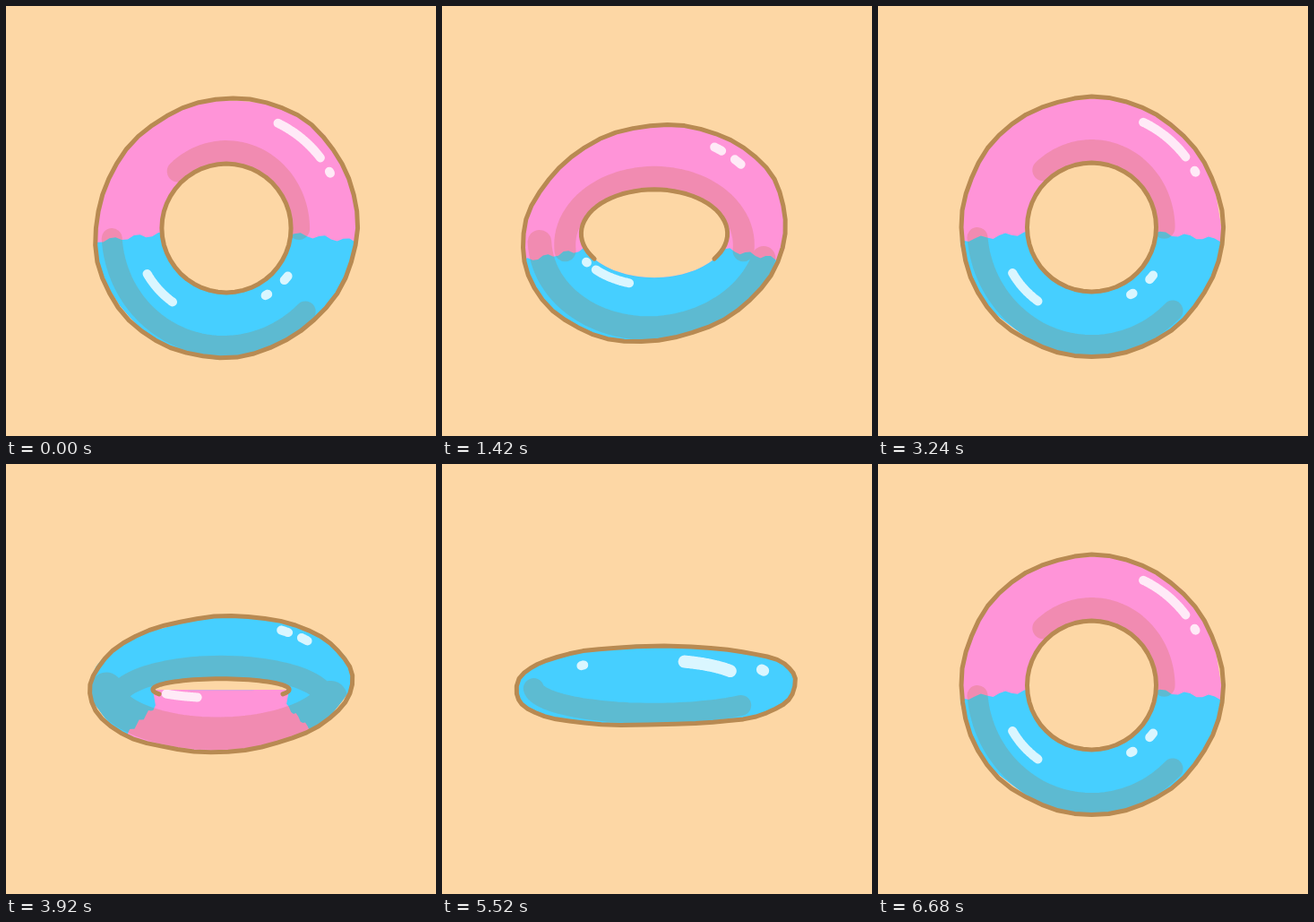
Recreate the animation shown at these times as an HTML page. Size 480x480 px, loop 6700 ms.

```html
<!DOCTYPE html>
<html>
<head>
<meta charset="utf-8">
<style>
  html, body { margin: 0; width: 100%; height: 100%; overflow: hidden; background: #fdd7a5; }
  svg { display: block; width: 100vw; height: 100vh; }
</style>
</head>
<body>
<svg id="stage" viewBox="0 0 480 480" fill="none" stroke-linecap="round" stroke-linejoin="round"></svg>
<script>
const PINK = '#ff94d8', BLUE = '#46cfff', LINE = '#b88a52', SHADE = '#b86b1a';
const TURN = 1675, LEAD = 10;

// One turn of the ring: angle in degrees, centre, sideways lean.
const POSES = [
  [357, 246, 248, .05], [30, 252, 247, .1], [60, 243, 247, .1], [88, 239, 248, .2],
  [110, 240, 246, .15], [143, 240, 250, .1], [178, 240, 248, 0], [227.5, 240, 246, .14],
  [247, 240, 245, .1], [268, 239, 246, .1], [281, 238, 241, -.2], [320.5, 237, 254, .12],
  [358, 238.5, 247, 0]
];

const rad = deg => deg * Math.PI / 180;
const mix = (a, b, k) => a + (b - a) * k;
const path = pts => 'M' + pts.map(p => p.map(v => v.toFixed(1))).join('L');

function random(seed) {
  return () => (seed = seed * 16807 % 2147483647) / 2147483647;
}

// Points of an elliptical arc; power < 1 squares it off, wobble(a) adds to both radii.
function arc(cx, cy, rx, ry, from, to, { lean = 0, power = 1, wobble = () => 0 } = {}) {
  const round = v => Math.sign(v) * Math.abs(v) ** power;
  return Array.from({ length: 49 }, (_, i) => {
    const a = rad(mix(from, to, i / 48)), w = wobble(a);
    const y = (ry + w) * round(Math.sin(a));
    return [cx + (rx + w) * round(Math.cos(a)) - lean * y, cy + y];
  });
}

function handWobble(rand, size) {
  const waves = [3, 5, 8, 13].map(n => [n, rand() * 7, size / Math.sqrt(n)]);
  return a => waves.reduce((sum, [n, phase, amp]) => sum + amp * Math.sin(n * a + phase), 0);
}

const stroke = (pts, width, color) =>
  `<path d="${path(pts)}" stroke="${color}" stroke-width="${width}"/>`;

function drawPose([angle, cx, cy, lean], index) {
  const rand = random(index * 977 + 31);
  const sin = Math.sin(rad(angle)), cos = Math.cos(rad(angle));
  const open = Math.abs(cos), steep = sin ** 4;
  const edge = open < .1, face = open > .95;
  const side = sin * cos < 0 ? 1 : -1;             // 1: far rim is on top, -1: below
  const colors = (edge ? sin < 0 : cos > 0) ? [PINK, BLUE] : [BLUE, PINK];

  const rx = edge ? 155 : 146, ry = 40 + 105 * open;
  const holeX = 72 + 10 * Math.sin(rad(2 * angle)) ** 2;
  const inner = 100 * open - 28;                   // half height of the gap, negative once closed
  const rimY = Math.max(inner, 12);
  const rimCy = cy + side * (rimY - inner);

  const form = { lean, power: edge ? .8 : 1 };
  const outline = arc(cx, cy, rx, ry, 0, 360, { ...form, wobble: handWobble(rand, 1) });
  const body = arc(cx, cy, rx, ry, 0, 360, { ...form, wobble: handWobble(rand, 2) });
  const rimArc = (from, to) => arc(cx, rimCy, holeX, side * rimY, from, to);
  const hole = inner > 0
    ? [...rimArc(180, 360), ...arc(cx, rimCy, holeX, side * Math.max(0, 2 * inner - rimY), 0, 180)] : [];
  const rim = edge ? [] : face ? rimArc(0, 360) : rimArc(inner > 20 ? 145 : 155, inner > 20 ? 395 : 385);

  // Wavy border between the colours, from the outline to the inner rim.
  const seamAngle = rad(side * 52 * steep + 6);
  const seamY = cy + side * 20 * Math.abs(sin) + 5;
  const seam = dir => Array.from({ length: 13 }, (_, i) => {
    const k = i / 12;
    return [mix(cx + dir * rx * 1.04 * Math.cos(seamAngle), cx + dir * (holeX - 3), k),
      mix(cy + ry * Math.sin(seamAngle), seamY, k) + 2.5 * Math.sin(i * 1.6 + dir + index)];
  });
  const lower = edge ? [] : [...seam(-1), ...rimArc(180, 360), ...seam(1).reverse(), [440, 440], [40, 440]];

  // Shading: a band over the far part of the gap and one along the bottom.
  const far = side > 0 && !face;
  const bandY = cy + side * 20 * Math.abs(sin);
  const bandX = holeX + (far ? 12 + 38 * steep : face ? 9 : 0);
  const lowWidth = far ? 24 + 16 * steep : 23;
  const shades = [
    stroke(arc(cx, cy, rx - 18, ry - lowWidth * .58, 175, far ? 15 : 45, { lean: lean / 2 }), lowWidth, SHADE)
  ];
  if (!edge) shades.push(stroke(
    arc(cx, bandY, bandX, bandY - cy + inner + 14, face ? 228 : far ? 175 : 195, face ? 360 : far ? 365 : 345),
    24, SHADE));

  const shines = [];
  const shine = (from, to, k, width = 10) =>
    shines.push(stroke(arc(cx, cy, rx * k, ry * k, from, to), width, '#fff'));
  const innerShine = (from, to, gap) =>
    shines.push(stroke(arc(cx, cy, holeX + gap, inner + gap, from, to), 10, '#fff'));
  if (edge) {
    shine(288, 324, .66, 14);
    shine(331, 333, .87, 12);
    shine(224, 226, .75);
  } else if (far) {
    shine(300, 304, .92);
    shine(312, 316, .92);
    if (inner > 0) innerShine(136, 108, 9);
    if (inner > 20) innerShine(146, 147, 9);
    if (inner < 0) shine(238, 239, .94);
  } else {
    shine(296, 323, .9);
    shine(331, 332, .9);
    if (face) {
      innerShine(150, 126, 30);
      innerShine(60, 58, 15);
      innerShine(42, 38, 15);
    } else {
      innerShine(157, 148, 17);
      innerShine(133, 132, 17);
      innerShine(82, 29, 17);
      innerShine(10, 9, 15);
      shine(234, 235, .72);
      shine(243, 244, .72);
    }
  }

  const gap = hole.length ? path(hole) + 'Z' : '';
  const ring = path(body) + 'Z' + gap;
  return `<g display="none">
    <clipPath id="ring${index}"><path d="${ring}" clip-rule="evenodd"/></clipPath>
    <g clip-path="url(#ring${index})">
      <path d="${path(body)}Z" fill="${colors[0]}"/>
      ${lower.length ? `<path d="${path(lower)}Z" fill="${colors[1]}"/>` : ''}
      <g opacity=".2">${shades.join('')}</g>
      <g opacity=".8">${shines.join('')}</g>
    </g>
    <path d="${path(outline)}Z${rim.length ? path(rim) : ''}" stroke="${LINE}" stroke-width="5"/>
  </g>`;
}

const stage = document.getElementById('stage');
stage.innerHTML = '<rect width="480" height="480" fill="#fdd7a5"/>' + POSES.map(drawPose).join('');
const layers = [...stage.querySelectorAll(':scope > g')];
const start = performance.now();
let shown = -1;

function update() {
  const t = performance.now() - start + LEAD;
  const next = Math.floor(t % TURN / TURN * POSES.length);
  if (next !== shown) {
    layers.forEach((g, i) => g.setAttribute('display', i === next ? 'inline' : 'none'));
    shown = next;
  }
  requestAnimationFrame(update);
}
update();
</script>
</body>
</html>
```
